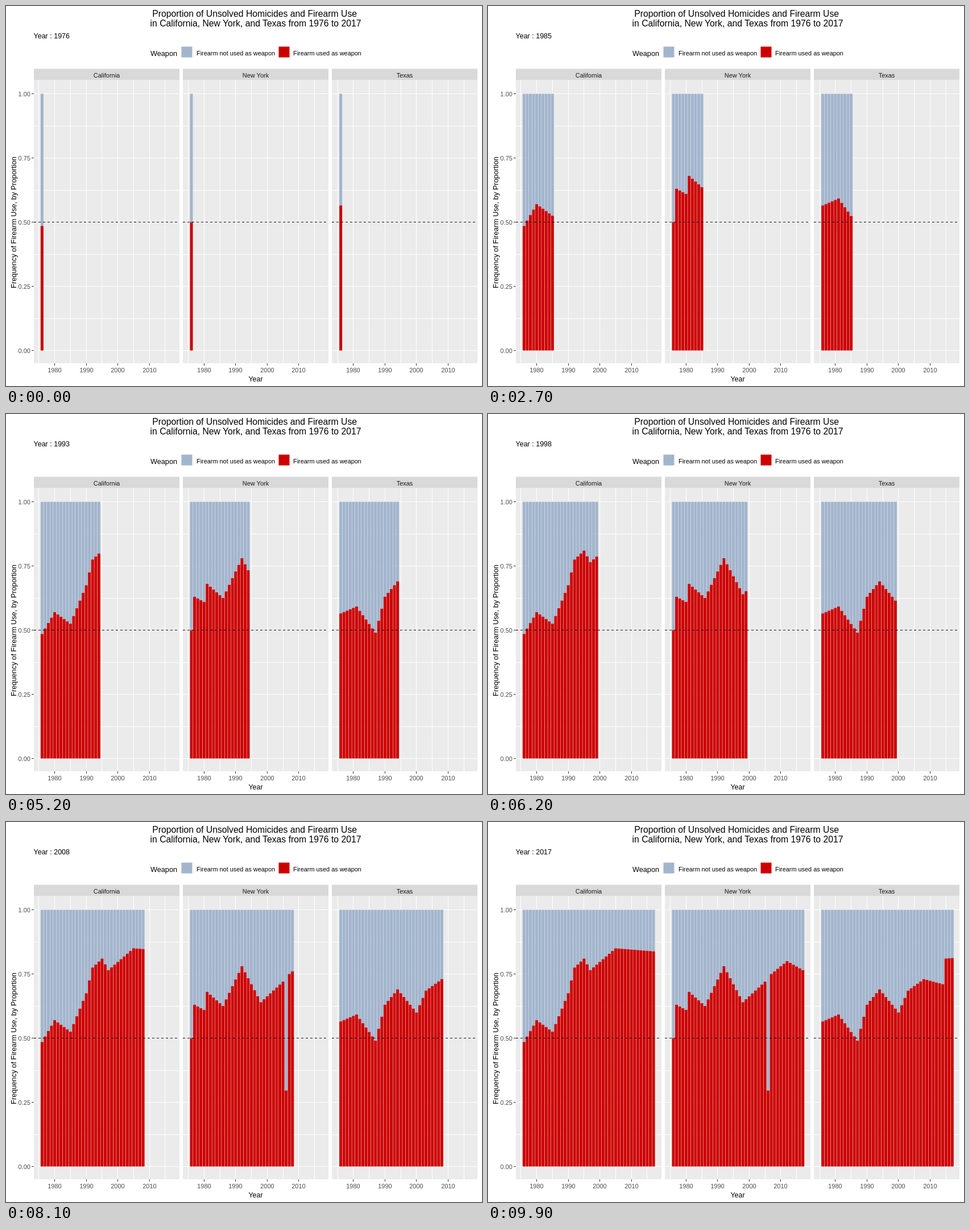
An HTML page for the animation above (10 s loop, 837 by 669 pixels).

```html
<!DOCTYPE html>
<html lang="en">
<head>
<meta charset="utf-8">
<title>Firearm use by state</title>
<style>
  html, body { margin: 0; width: 100%; height: 100%; overflow: hidden; background: #fff; }
  svg { display: block; width: 837px; height: 669px; font-family: "Liberation Sans", Arial, sans-serif; }
</style>
</head>
<body>
<svg id="chart" viewBox="0 0 837 669"></svg>
<script>
const svg = document.getElementById("chart");
const BLUE = "#a2b5cd", RED = "#cd0000", GREY = "#4d4d4d";
const FIRST = 1976, LAST = 2017;
const STEP = 5.553, BAR_W = 0.9 * STEP;
const PANEL_W = 256, TOP = 131, BOTTOM = 629;

// Turning points of the share of firearm use; years between are interpolated
const states = {
  "California": {
    1976: 0.485, 1980: 0.57, 1985: 0.525, 1990: 0.675, 1992: 0.775,
    1995: 0.81, 1997: 0.765, 2005: 0.85, 2017: 0.838 },
  "New York": {
    1976: 0.5, 1977: 0.63, 1980: 0.61, 1981: 0.68, 1986: 0.625, 1992: 0.78,
    1998: 0.64, 2005: 0.72, 2006: 0.296, 2007: 0.75, 2012: 0.8, 2017: 0.765 },
  "Texas": {
    1976: 0.565, 1981: 0.592, 1987: 0.49, 1990: 0.63, 1994: 0.69, 2000: 0.6,
    2003: 0.685, 2008: 0.73, 2014: 0.71, 2015: 0.81, 2017: 0.812 }
};

function shareAt(points, year) {
  const years = Object.keys(points).map(Number);
  const b = years.find(y => y >= year);
  if (b === year) return points[b];
  const a = years[years.indexOf(b) - 1];
  return points[a] + (points[b] - points[a]) * (year - a) / (b - a);
}

function add(parent, tag, attrs, text = "") {
  const el = document.createElementNS("http://www.w3.org/2000/svg", tag);
  for (const key in attrs) el.setAttribute(key, attrs[key]);
  el.textContent = text;
  return parent.appendChild(el);
}
const rect = (x, y, width, height, fill, parent = svg) =>
  add(parent, "rect", { x, y, width, height, fill });
const label = (text, x, y, size, anchor = "start", fill = "#000", more = {}) =>
  add(svg, "text", { x, y, "font-size": size, "text-anchor": anchor, fill, ...more }, text);

const yOf = share => 606.5 - 452 * share;
const rowOf = share => Math.floor(yOf(share));

// Titles and legend
label("Proportion of Unsolved Homicides and Firearm Use", 437.2, 19, 15.75, "middle");
label("in California, New York, and Texas from 1976 to 2017", 439, 35.5, 15.75, "middle");
const yearLabel = label("", 48.5, 56.5, 12.5);
label("Weapon", 254, 87.5, 12.7);
rect(308.5, 71.5, 19, 19, BLUE);
label("Firearm not used as weapon", 335, 87, 10.9);
rect(479.5, 71.5, 19, 19, RED);
label("Firearm used as weapon", 505, 87, 10.9);
label("Year", 439, 660.5, 12.4, "middle");
label("Frequency of Firearm Use, by Proportion", 0, 0, 12.8, "middle", "#000",
  { transform: "translate(17.5 381) rotate(-90)" });

for (let v = 0; v <= 1; v += 0.25) {
  rect(45, rowOf(v), 4, 1, "#333");
  label(v.toFixed(2), 43, rowOf(v) + 5, 11, "end", GREY);
}

// Panels; bars holds one group per state and year
const bars = [];
Object.entries(states).forEach(([name, points], p) => {
  const left = Math.floor(49 + p * 262.4);
  const xOf = year => 63.4 + p * 262.625 + (year - FIRST) * STEP;

  rect(left, 110.5, PANEL_W, 20, "#d9d9d9");
  label(name, left + PANEL_W / 2, 126, 11, "middle", "#1a1a1a");
  rect(left, TOP, PANEL_W, BOTTOM - TOP, "#ebebeb");

  for (let k = 0; k <= 8; k++) rect(left, rowOf(k / 8), PANEL_W, 1, "#fff");
  for (let year = 1975; year <= 2015; year += 5) {
    const x = Math.floor(xOf(year));
    rect(x, TOP, 1, BOTTOM - TOP, "#fff");
    if (year % 10 === 0) {
      rect(x, BOTTOM, 1, 4, "#333");
      label(year, x + 0.5, 645, 11, "middle", GREY);
    }
  }

  for (let year = FIRST; year <= LAST; year++) {
    const x = xOf(year) - BAR_W / 2, y = yOf(shareAt(points, year));
    const group = add(svg, "g", {});
    rect(x, yOf(1), BAR_W, y - yOf(1), BLUE, group);
    rect(x, y, BAR_W, yOf(0) - y, RED, group);
    bars.push({ year, group });
  }

  add(svg, "line", { x1: left, x2: left + PANEL_W, y1: 380.5, y2: 380.5,
    stroke: "#000", "stroke-dasharray": "4 4" });
});

// Three ticks per year at first, then two; each bar appears one tick before its label
const yearAt = tick => FIRST + Math.floor(tick < 50 ? tick / 3 : (tick - 17) / 2);

function draw(now) {
  const tick = Math.floor(now % 10000 / 100);
  const newest = tick === 49 ? yearAt(49) : yearAt(tick + 1);
  for (const { year, group } of bars)
    group.setAttribute("visibility", year <= newest ? "visible" : "hidden");
  yearLabel.textContent = "Year : " + yearAt(tick);
  requestAnimationFrame(draw);
}
draw(performance.now());
</script>
</body>
</html>
```
